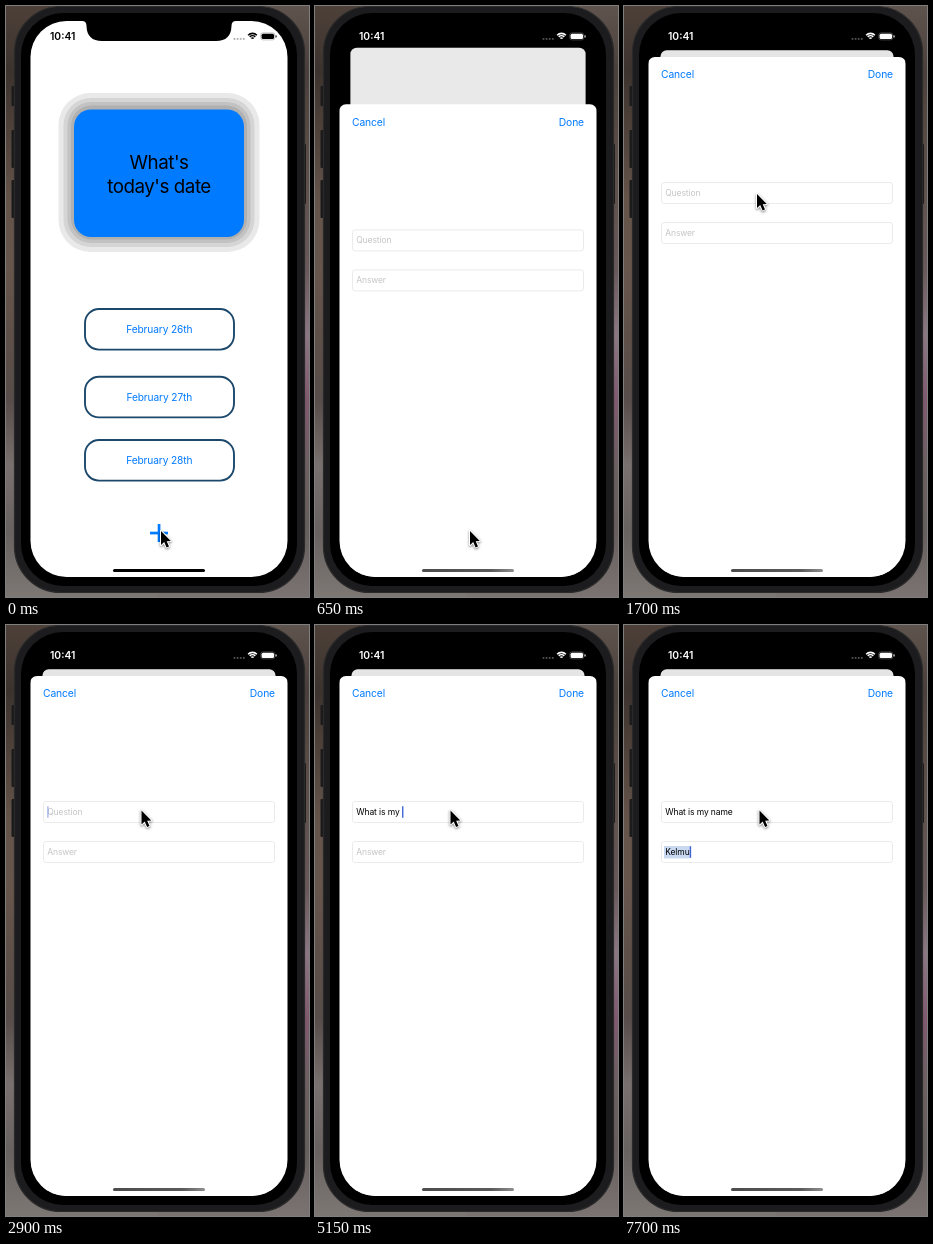
These frames come from a looping animation (303x591 px, 8000 ms). An HTML page with a canvas:

```html
<!DOCTYPE html>
<html lang="en">
<head>
<meta charset="utf-8">
<title>Flashcards</title>
<style>
  html, body { margin: 0; width: 100%; height: 100%; overflow: hidden; background: #000; }
  canvas { display: block; width: 303px; height: 591px; }
</style>
</head>
<body>
<canvas id="stage"></canvas>
<script>
const W = 303, H = 591, LOOP = 8000, STEP = 150;
const BLUE = '#007aff';
const canvas = document.getElementById('stage');
const ctx = canvas.getContext('2d');
const ratio = window.devicePixelRatio || 1;
canvas.width = Math.round(W * ratio);
canvas.height = Math.round(H * ratio);

const QUESTION = 'What is my name', ANSWER = 'Kelmu';
// [time, letters typed]
const questionKeys = [[3200, 1], [3500, 3], [3950, 5], [4100, 6], [4250, 7], [4400, 8], [4550, 9],
  [5000, 10], [5150, 11], [5300, 12], [5600, 14], [5750, 15]];
const answerKeys = [[6950, 1], [7100, 2], [7250, 3], [7400, 4], [7550, 5]];
// [time, x, y]
const pointerKeys = [[0, 155, 525], [1100, 154, 480], [1250, 147, 320], [1400, 130, 206],
  [1550, 128, 196], [1700, 133, 188], [1850, 135.5, 185.5]];

const latest = (keys, t) => keys.reduce((found, key) => key[0] <= t ? key : found, null);
const lettersAt = (keys, t) => (latest(keys, t) || [0, 0])[1];
const mix = (a, b, p) => a + (b - a) * p;

function box(x, y, w, h, r, fill, stroke, line = 1) {
  ctx.beginPath();
  ctx.roundRect(x, y, w, h, r);
  if (fill) { ctx.fillStyle = fill; ctx.fill(); }
  if (stroke) { ctx.strokeStyle = stroke; ctx.lineWidth = line; ctx.stroke(); }
}

function setFont(size, tracking = -0.012, weight = 400) {
  ctx.font = `${weight} ${size}px Inter, "Liberation Sans", sans-serif`;
  ctx.letterSpacing = `${size * tracking}px`;
}

// y is the middle of the capital letters
function label(text, x, y, size, color, align = 'left', tracking, weight) {
  setFont(size, tracking, weight);
  ctx.textAlign = align;
  ctx.fillStyle = color;
  ctx.fillText(text, x, y + size * 0.36);
}

function strip(x, w, colors) {
  const fill = ctx.createLinearGradient(0, 0, 0, H);
  colors.forEach((c, i) => fill.addColorStop(i / (colors.length - 1), c));
  ctx.fillStyle = fill;
  ctx.fillRect(x, 0, w, H);
}

function drawPhone() {
  strip(0, 152, ['#4d4039', '#3d332e', '#51443c', '#65544a', '#67564c', '#5e5049', '#584d4a', '#79716f', '#686260', '#7d7774']);
  strip(152, 151, ['#5f534d', '#4a403b', '#584b45', '#60534e', '#69595b', '#8b7782', '#80596f', '#6c6061', '#665f5d', '#7a7371']);
  box(5.5, 80, 4, 20, 1, '#1b1b1c');
  box(5.5, 124, 4, 38, 1, '#1b1b1c');
  box(5.5, 174, 4, 38, 1, '#1b1b1c');
  box(296, 138, 4, 60, 1, '#1b1b1c');
  box(8.5, 0.5, 290, 586, 46, '#1c1c1e', '#2a2a2b', 1.2);
  box(15, 7, 276, 573, 42, '#000');
}

function drawNotch() {
  ctx.fillStyle = '#000';
  ctx.beginPath();
  ctx.moveTo(76, 14);
  ctx.lineTo(76, 15);
  ctx.quadraticCurveTo(80.5, 15, 80.5, 20);
  ctx.quadraticCurveTo(81, 35, 96, 35);
  ctx.lineTo(210, 35);
  ctx.quadraticCurveTo(225, 35, 225.5, 20);
  ctx.quadraticCurveTo(225.5, 15, 230, 15);
  ctx.lineTo(230, 14);
  ctx.fill();
}

function drawStatus(color) {
  label('10:41', 44, 30.3, 10.3, color, 'left', 0, 600);
  ctx.globalAlpha = 0.35;
  for (let i = 0; i < 4; i++) box(227.5 + i * 3.1, 32, 2, 1.8, 0.9, color);
  box(254.8, 26.9, 14, 7, 2.2, null, color, 0.7);
  ctx.globalAlpha = 1;
  box(255.6, 27.7, 12.4, 5.4, 1.5, color);
  box(269.5, 29.2, 1.1, 2.4, 0.6, color);
  ctx.strokeStyle = color;
  ctx.lineWidth = 1.6;
  for (const r of [1.6, 3.9, 6.2]) {
    ctx.beginPath();
    ctx.arc(246.5, 33.6, r, -Math.PI * 0.75, -Math.PI * 0.25);
    ctx.stroke();
  }
}

function drawShadow(moving) {
  const bands = moving
    ? [[22.8, '#f0f0f0'], [14.5, '#e2e2e2'], [10, '#d4d4d4'], [6, '#c7c7c7'], [2.5, '#b8b8b8']]
    : [[15.5, '#e9e9e9'], [10.5, '#d5d5d5'], [6.5, '#c2c2c2'], [3, '#b0b0b0']];
  for (const [d, color] of bands) {
    box(68 - d, 102.5 - d, 170 + 2 * d, 128 + 2 * d, 18 + d * 0.9, color);
  }
}

function drawCardScreen(p) {
  const scale = mix(1, 0.903, p);
  ctx.save();
  ctx.translate(153, mix(15, 44.2, p));
  ctx.scale(scale, scale);
  ctx.translate(-153, -15);
  ctx.beginPath();
  ctx.roundRect(24, 15, 258, 600, p ? 7 : 0);
  ctx.clip();
  ctx.fillStyle = '#fff';
  ctx.fillRect(20, 10, 266, 610);

  drawShadow(p > 0);
  box(68, 103.5, 170, 127.5, 17, BLUE);
  label("What's", 153, 156.2, 18.8, '#000', 'center', -0.025);
  label("today's date", 153, 179.8, 18.8, '#000', 'center', -0.025);

  [303, 370.8, 434].forEach((y, i) => {
    box(79, y, 149, 40.6, 14, null, '#1c486b', 1.9);
    label(`February ${26 + i}th`, 153.3, y + 20.1, 10.2, BLUE, 'center');
  });
  ctx.fillStyle = BLUE;
  ctx.fillRect(144, 525.7, 18, 2.7);
  ctx.fillRect(151.7, 518, 2.7, 18);

  ctx.fillStyle = `rgba(0, 0, 0, ${0.1 * p ** 1.5})`;
  ctx.fillRect(20, 10, 266, 610);
  ctx.restore();
}

function drawCaret(x, y, alpha) {
  ctx.globalAlpha = alpha;
  ctx.fillStyle = '#4166d5';
  ctx.fillRect(x, y - 5.8, 1.4, 11.6);
  ctx.globalAlpha = 1;
}

function drawField(y, text, hint, caret, selected, faint) {
  box(37.5, y - 10.5, 231, 21, 2.5, null, faint ? '#f5f5f5' : '#e9e9ea', 0.9);
  setFont(8.5);
  const end = 41.2 + ctx.measureText(text).width;
  if (selected) {
    ctx.fillStyle = '#c9d9f1';
    ctx.fillRect(40, y - 6, end - 39.5, 12.4);
  }
  label(text || hint, 41.2, y, 8.5, text ? '#000' : '#c4c4c6');
  if (caret) drawCaret(end + (text ? 0.2 : 0), y, caret);
}

function questionCaret(t) {
  if (t < 2300 || t >= 6350) return 0;
  if (t >= 2900 && t < 3050) return 0.45;
  return t >= 3050 && t < 3200 ? 0 : 1;
}

function drawSheet(p, t) {
  const moving = p < 0.9;
  ctx.save();
  ctx.translate(0, mix(591, 51, p));
  box(24, 0, 258, 600, 7, moving ? '#f9f9f9' : '#fff');
  label('Cancel', 37, 17.6, 10.3, BLUE);
  label('Done', 269, 17.6, 10.3, BLUE, 'right');
  drawField(136, QUESTION.slice(0, lettersAt(questionKeys, t)), 'Question', questionCaret(t), false, moving);
  drawField(176, ANSWER.slice(0, lettersAt(answerKeys, t)), 'Answer', t >= 6350 ? 1 : 0, t >= 7700, moving);
  ctx.restore();
}

function drawHomeBar(p) {
  const fill = ctx.createLinearGradient(107, 0, 199, 0);
  fill.addColorStop(0, p ? '#4c4c4c' : '#000');
  fill.addColorStop(0.75, p ? '#5a5a5a' : '#000');
  fill.addColorStop(1, p ? '#8e8e8e' : '#000');
  box(107, 563, 92, 3, 1.5, fill);
}

function drawPointer(x, y) {
  const points = [[0, 0], [0, 14], [3.2, 11], [5.6, 16.4], [8, 15.4], [5.7, 10.2], [9.8, 10]];
  ctx.save();
  ctx.beginPath();
  for (const [dx, dy] of points) ctx.lineTo(x + dx, y + dy);
  ctx.closePath();
  ctx.lineJoin = 'round';
  ctx.strokeStyle = '#fff';
  ctx.lineWidth = 2;
  ctx.shadowColor = 'rgba(0, 0, 0, 0.5)';
  ctx.shadowBlur = 2.5 * ratio;
  ctx.shadowOffsetY = ratio;
  ctx.stroke();
  ctx.shadowColor = 'transparent';
  ctx.fillStyle = '#000';
  ctx.fill();
  ctx.restore();
}

// Critically damped spring for the sheet
function sheetProgress(t) {
  if (t < 500) return 0;
  const s = (t - 500 + 72) * 0.01826;
  const p = 1 - (1 + s) * Math.exp(-s);
  return p > 0.998 ? 1 : p;
}

function draw(time) {
  const t = Math.max(0, Math.floor((time - 50) / STEP) * STEP + 50);
  const p = sheetProgress(t);
  ctx.setTransform(ratio, 0, 0, ratio, 0, 0);
  drawPhone();
  ctx.save();
  ctx.beginPath();
  ctx.roundRect(24.5, 15, 257, 556, 36);
  ctx.clip();
  ctx.fillStyle = '#000';
  ctx.fillRect(24, 15, 258, 557);
  drawCardScreen(p);
  drawNotch();
  drawStatus(p < 0.5 ? '#000' : '#fff');
  if (p) drawSheet(p, t);
  drawHomeBar(p);
  ctx.restore();
  const [, x, y] = latest(pointerKeys, t);
  drawPointer(x, y);
}

function tick() {
  draw(performance.now() % LOOP);
  requestAnimationFrame(tick);
}
tick();
</script>
</body>
</html>
```
